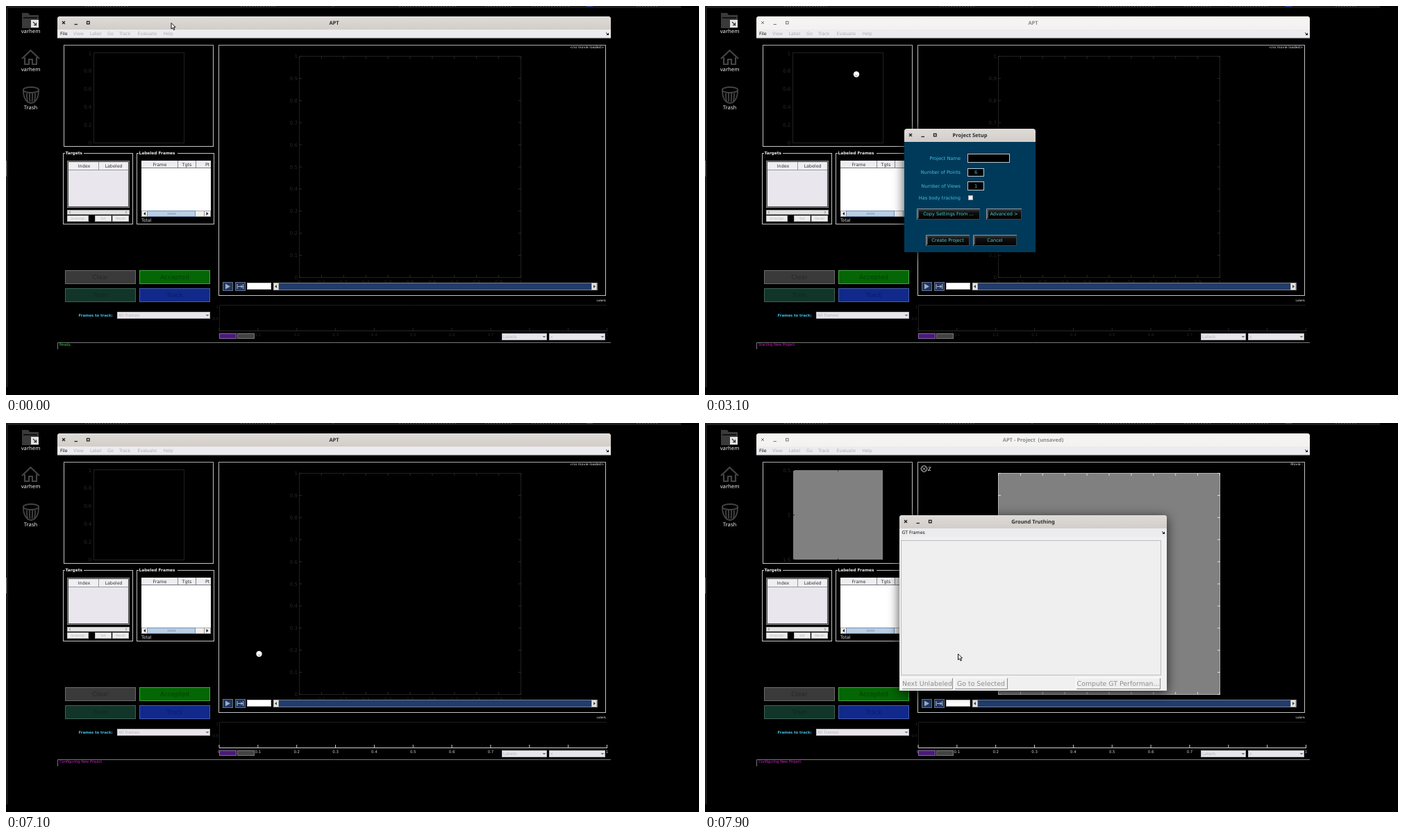
Animation, 998 px wide and 561 px high, one loop 8000 ms. Source, as an HTML page with a canvas:

```html
<!DOCTYPE html>
<html lang="en">
<head>
<meta charset="utf-8">
<title>Project setup</title>
<style>
html, body { margin: 0; width: 998px; height: 561px; overflow: hidden; background: #000 }
canvas { display: block }
</style>
</head>
<body>
<canvas id="stage" width="998" height="561"></canvas>
<script>
const c = document.getElementById('stage').getContext('2d');
const LOOP = 8000, STEP = 100;
const DEJAVU = '"DejaVu Sans", sans-serif', NOTO = '"Noto Sans", "Open Sans", sans-serif';
const DIM = '#272727', OFF = '#aeaeb0', LINE = '#c4c4c4', PALE = '#e9e7ed', BLUE = '#1f4e99';
c.textRendering = 'geometricPrecision';

// Corner-to-corner rectangle with optional one-pixel border
function box(x, y, x2, y2, fill, edge) {
  if (fill) { c.fillStyle = fill; c.fillRect(x, y, x2 - x, y2 - y); }
  if (edge) {
    c.strokeStyle = edge; c.lineWidth = 1;
    c.strokeRect(x + .5, y + .5, x2 - x - 1, y2 - y - 1);
  }
}

function line(color, width, ...p) {
  c.strokeStyle = color; c.lineWidth = width;
  c.beginPath();
  for (let i = 0; i < p.length; i += 2) c.lineTo(p[i], p[i + 1]);
  c.stroke();
}

function poly(color, ...p) {
  c.fillStyle = color;
  c.beginPath();
  for (let i = 0; i < p.length; i += 2) c.lineTo(p[i], p[i + 1]);
  c.fill();
}

// y is the middle of the capitals
function text(s, x, y, size, color, align = 'left', weight = '', font = DEJAVU) {
  c.font = `${weight} ${size}px ${font}`;
  c.textAlign = align;
  c.fillStyle = color;
  c.fillText(s, x, y + size * .36);
}
const bold = (s, x, y, size, color) => text(s, x, y, size, color, 'left', 'bold');

function trash() {
  c.strokeStyle = '#444'; c.lineWidth = 1.8;
  c.beginPath(); c.ellipse(36, 121, 11.2, 4, 0, 0, 7); c.stroke();
  c.beginPath(); c.moveTo(25, 122);
  c.bezierCurveTo(25, 146, 47, 146, 47, 122);
  c.stroke();
  for (const dx of [-6, -2, 2, 6]) {
    c.beginPath(); c.moveTo(36 + dx, 126);
    c.quadraticCurveTo(36 + dx, 134, 36 + dx * .8, 138);
    c.stroke();
  }
}

function desktop() {
  box(0, 0, 998, 561, '#000');
  box(0, 0, 972, 3, '#1d1d1d');
  box(0, 0, 3, 550, '#191919');
  box(0, 223, 1, 246, '#777');
  for (const [x, w] of [[114, 62], [338, 52], [470, 4], [566, 84], [690, 40], [757, 55], [908, 32]])
    for (let i = 0; i < w; i += 4) box(x + i, 0, x + i + 2, 1, '#505050');
  box(836, 0, 845, 1, '#2b4cae');

  poly('#3a3a3a', 23, 10, 32, 10, 34, 13, 47, 13, 47, 32, 23, 32);
  box(25, 16, 45, 18, '#111');
  box(36, 20, 47, 31, '#e4e4e4');
  line('#333', 1.2, 39, 23, 43.5, 27.5, 43.5, 24);
  line('#333', 1.2, 43.5, 27.5, 40, 27.5);

  line('#444', 2.2, 23, 76, 35.5, 64, 48, 76);
  line('#444', 2.2, 27, 74, 27, 84, 33, 84, 33, 77, 38, 77, 38, 84, 44, 84, 44, 74);
  trash();

  for (const [s, y] of [['varhem', 36], ['varhem', 91], ['Trash', 146]])
    text(s, 35.5, y, 7.7, '#f0f0f0', 'center', '', NOTO);
}

// Window frame with soft shadow: title bar with three buttons, then a body
function frame(x, y, x2, y2, bar, title, active, body) {
  c.save();
  c.shadowColor = 'rgba(0,0,0,.75)'; c.shadowBlur = 16; c.shadowOffsetY = 3;
  c.fillStyle = body;
  c.beginPath(); c.roundRect(x, y, x2 - x, y2 - y, [4, 4, 0, 0]); c.fill();
  c.restore();
  const g = c.createLinearGradient(0, y, 0, y + 19);
  g.addColorStop(0, active ? '#dfdbd8' : '#f6f5f4');
  g.addColorStop(1, active ? '#d2cdc8' : '#f3f2f1');
  c.fillStyle = g;
  c.beginPath(); c.roundRect(x, y, x2 - x, bar - y, [4, 4, 0, 0]); c.fill();
  const ink = active ? '#222' : '#777', w = active ? 1.3 : 1, m = y + 9;
  line(ink, w, x + 7, m - 2, x + 11, m + 2);
  line(ink, w, x + 11, m - 2, x + 7, m + 2);
  line(ink, w, x + 24.5, m + 2.5, x + 29, m + 2.5);
  c.lineWidth = w; c.strokeRect(x + 42.5, m - 1.7, 3.6, 3.6);
  text(title, (x + x2) / 2, m + .4, 7.5, active ? '#2b2f30' : '#85888a', 'center', 'bold', NOTO);
}

function dockArrow(x, y) {
  line('#111', 1, x - 2, y - 1.5, x + 1, y + 1);
  poly('#111', x + 2, y - 1.5, x + 2, y + 2, x - 1.5, y + 2);
}

function dropdown(x, x2, y, s) {
  box(x, y, x2, y + 10, '#e8e6eb', '#b5b5bb');
  text(s, x + 2, y + 5, 6, '#b5b5ba');
  poly('#777', x2 - 6.5, y + 4, x2 - 1.5, y + 4, x2 - 4, y + 6.5);
}

function panel(x, x2, title, titleEnd) {
  box(x, 212, x2, 315, null, LINE);
  box(x + 3, 209, titleEnd, 215, '#000');
  bold(title, x + 3.5, 212.3, 5.85, '#e8e8e8');
}

function lists() {
  panel(82, 183, 'Targets', 112);
  box(88, 223, 178, 291, '#000', '#8a8a8a');
  box(89, 224, 177, 290, PALE, '#444');
  box(90, 225, 176, 236, '#efeef2');
  line('#999', 1, 90, 236.5, 176, 236.5);
  line('#999', 1, 133.5, 225, 133.5, 236);
  text('Index', 112.5, 230.5, 6.4, '#333', 'center');
  text('Labeled', 155, 230.5, 6.4, '#333', 'center');
  box(88, 294, 178, 301, '#e2e2e2', '#aaa');
  line('#888', 1, 93, 296, 91, 297.5, 93, 299);
  line('#888', 1, 172, 296, 174, 297.5, 172, 299);
  for (const [x, x2, s] of [[88, 119, 'Unassign'], [128, 152, 'Set'], [153, 177, 'Recall']]) {
    box(x, 302, x2, 311, '#ededed', '#bbb');
    text(s, (x + x2) / 2, 306.5, 4.6, '#b4b4b4', 'center');
  }

  panel(188, 300, 'Labeled Frames', 247);
  box(195, 223, 295, 304, '#fff');
  box(195, 223, 295, 233, '#eeedf1');
  line('#777', 1, 195, 233.5, 295, 233.5);
  for (const x of [247.5, 273.5]) line('#888', 1, x, 223, x, 233);
  text('Frame', 221.5, 228.5, 6.4, '#333', 'center');
  text('Tgts', 260.5, 228.5, 6.4, '#333', 'center');
  text('Pt', 287, 228.5, 6.4, '#333');
  box(195, 295, 295, 304, '#eee', '#aaa');
  box(203, 295, 273, 304, '#b9cfe4', '#7590b4');
  for (let x = 233; x < 245; x += 2) box(x, 298, x + 1, 301, '#849fbf');
  line('#999', 1, 285.5, 295, 285.5, 304);
  poly('#222', 201, 297, 201, 302, 198, 299.5);
  poly('#222', 288.5, 297, 288.5, 302, 291.5, 299.5);
  text('Total', 195, 309, 6.2, '#d8d8d8');
}

function bigButton(x, y, s, fill, edge, ink) {
  box(x, y, x + 102, y + 20, fill, edge);
  text(s, x + 51, y + 9.5, 9, ink, 'center');
}

function controls() {
  bigButton(85, 381, 'Clear', '#3b3a3a', '#6b6b6b', '#272727');
  bigButton(192, 381, 'Accepted', '#046604', '#43a743', '#034003');
  bigButton(85, 407, 'Train', '#123529', '#3d6455', '#0c2a20');
  bigButton(192, 407, 'Track', '#10298b', '#475dae', '#0a1d6c');
  bold('Frames to track:', 104.5, 446, 5.3, '#45bde2');
  dropdown(160, 294, 441, 'All frames');

  for (const x of [312, 330]) box(x, 398, x + 15, 411, '#203660', '#65708a');
  poly('#9fabbf', 316, 400.5, 316, 408.5, 323, 404.5);
  line('#b5bfce', 1, 333, 401, 333, 408);
  line('#b5bfce', 1, 341.5, 401, 341.5, 408);
  line('#b5bfce', 1, 334, 404.5, 340.5, 404.5);
  line('#b5bfce', 1, 338, 402.5, 340.5, 404.5, 338, 406.5);
  box(347, 399, 382, 409, '#fff', '#bbb');
  box(385, 399, 852, 410, '#223c6b', '#737f96');
  for (const [x, d] of [[385, -1], [843, 1]]) {
    box(x, 399, x + 8, 410, '#e4e4e4', '#aaa');
    poly('#444', x + 4 - d, 402, x + 4 - d, 407, x + 4 + 2 * d, 404.5);
  }
}

function plots(loaded) {
  box(83, 56, 299, 203, null, LINE);
  box(306, 56, 864, 418, null, LINE);
  if (loaded) {
    box(127, 68, 256, 197, '#808080');
    ['0.5', '1', '1.5'].forEach((s, i) => {
      text(s, 123.5, 68 + i * 64.6, 7.3, DIM, 'right');
      line('#222', 1, 127, 68.5 + i * 64.2, 129, 68.5 + i * 64.2);
    });
    for (const y of [68, 195]) box(191, y, 192, y + 2, '#333');
    box(422, 72, 742, 392, '#808080', '#b4b4b4');
  } else {
    box(126, 67, 257, 198, null, '#202020');
    for (let i = 0; i < 6; i++)
      text(i / 5, 123.5, 197 - i * 25.8, 7.3, DIM, 'right');
    box(422, 72, 742, 392, null, '#202020');
  }
  const tick = loaded ? '#e0e0e0' : '#2c2c2c';
  for (let i = 0; i <= 10; i++) {
    const x = 422.5 + i * 31.9, y = 391.5 - i * 31.9;
    line(tick, 1, 422, y, 426, y);
    line(tick, 1, 738, y, 742, y);
    line(tick, 1, x, 391, x, 388);
    line(tick, 1, x, 73, x, 76);
    if (!loaded) {
      text(i / 10, 420, y, 7.2, DIM, 'right');
      text(i / 10, x, 398.5, 7.2, DIM, 'center');
    }
  }
  if (loaded) {
    c.strokeStyle = '#d8d8d8'; c.lineWidth = 1;
    c.beginPath(); c.arc(315.5, 66, 4.3, 0, 7); c.stroke();
    line('#d8d8d8', .8, 312.5, 63, 318.5, 69);
    line('#d8d8d8', .8, 318.5, 63, 312.5, 69);
    text('z', 321, 65, 12, '#e0e0e0', 'left', 'italic', '"Liberation Serif", serif');
  }
  text(loaded ? 'Movie :' : '<no movie loaded>', 861, 59.5, 4.9, '#f4f4f4', 'right');
}

function timeline(lit) {
  text('Labels', 864, 424, 4.2, '#f0f0f0', 'right');
  line('#1d1d1d', 1, 307.5, 470, 307.5, 431.5, 865, 431.5);
  text('1', 306, 434, 5.4, DIM, 'right');
  text('0.5', 306, 451.5, 5.4, DIM, 'right');
  const ink = lit ? '#d0d0d0' : DIM;
  line(ink, 1, 307, 468.5, 866, 468.5);
  for (let i = 0; i <= 10; i++) {
    const x = 307 + i * 55.85;
    line(ink, 1, x, 468, x, 464);
    text(i / 10, x, 474, 5.4, ink, 'center');
  }
  box(307, 472, 332, 480, '#4a1a78', '#8765a5');
  box(333, 472, 358, 480, '#434343', '#777');
  dropdown(714, 779, 472, 'Labels');
  dropdown(782, 863, 472, 'x');
}

function mainWindow(t) {
  const loaded = t >= 7300, active = t < 2800 || t >= 6600 && t < 7400;
  plots(loaded);
  lists();
  controls();
  timeline(t >= 6900);
  line('#777', 1, 74.5, 495, 74.5, 485.5, 871, 485.5);
  const [msg, ink] = t < 1900 ? ['Ready.', '#2ee02e']
    : [t < 6500 ? 'Starting New Project.' : 'Configuring New Project.', '#d524d0'];
  text(msg, 77, 488.6, 5.1, ink);

  frame(74, 15, 871, 46, 34, loaded ? 'APT - Project  (unsaved)' : 'APT', active, '#ecebee');
  line('#c8c8cc', 1, 74, 46, 871, 46);
  const open = t >= 800 && t < 1900;
  if (open) box(74, 34, 92, 46, BLUE);
  const menus = [['File', 78], ['View', 97], ['Label', 120.5], ['Go', 146], ['Track', 163], ['Evaluate', 189.5], ['Help', 226.5]];
  menus.forEach(([s, x], i) => text(s, x, 40, 6.3, i ? OFF : open ? '#fff' : '#111'));
  dockArrow(866, 40);
}

function fileMenu(t) {
  if (t < 1100 || t >= 1900) return;
  box(74, 46, 182, 167, '#fff', '#9a9a9a');
  // label, y, enabled, shortcut
  const items = [
    ['Quick Open Movie', 53.5, 1], ['New Project...', 65.8, 1], ['Save Project', 77, 0, 'Ctrl+S'],
    ['Save Project As...', 88.5, 0], ['Load Project...', 100, 1, 'Ctrl+O'], ['Shortcuts...', 111.5, 0],
    ['Manage Movies...', 124, 0, 'Ctrl+M'], ['Import/Export', 135.5, 0], ['Edit cropping', 148, 0], ['Quit', 160.3, 1]
  ];
  const hot = t < 1500 ? -1 : t < 1600 ? 0 : 1;
  items.forEach(([s, y, on, key], i) => {
    if (i === hot) box(75, y - 5.8, 181, y + 5.7, BLUE);
    const ink = i === hot ? '#dce8ff' : on ? '#111' : OFF;
    text(s, 88, y, 6.27, ink);
    if (key) text(key, 168.5, y, 5.1, ink, 'right');
  });
  for (const y of [117.5, 141.5, 154.5]) line('#aaa', 1, 75, y, 181, y);
  poly('#aaa', 173, 133, 173, 138, 176, 135.5);
}

function darkButton(x, x2, y, s) {
  const g = c.createLinearGradient(0, y, 0, y + 16);
  g.addColorStop(0, '#4a4a4a'); g.addColorStop(.35, '#101010'); g.addColorStop(1, '#000');
  box(x, y, x2, y + 16, g);
  line('#8a9298', 1, x2, y + .5, x + .5, y + .5, x + .5, y + 16);
  line('#555', 2, x + 2, y + 2, x + 2, y + 14);
  line('#3a444a', 1, x + 1, y + 15.5, x2 - .5, y + 15.5, x2 - .5, y + 1);
  text(s, (x + x2) / 2, y + 7.8, 6.6, '#3fd0cf', 'center');
}

function setupDialog(t) {
  if (t < 2800 || t >= 6600) return;
  frame(287, 177, 476, 355, 196, 'Project Setup', true, '#003a5b');
  const ink = '#43bfdc';
  [['Project Name', 219.5], ['Number of Points', 240], ['Number of Views', 260], ['Has body tracking', 276.3]]
    .forEach(([s, y]) => text(s, 368, y, 6.65, ink, 'right'));
  box(378, 213, 439, 226, '#000', '#c0c8cc');
  box(378, 234, 402, 246, '#000', '#c0c8cc');
  box(378, 253, 402, 266, '#000', '#c0c8cc');
  text('6', 390, 240, 6.65, ink, 'center');
  text('1', 390, 260, 6.65, ink, 'center');
  box(379, 273, 386, 280, '#f2f2f2', '#a8a8a8');
  darkButton(305, 396, 292, 'Copy Settings From ...');
  darkButton(405, 456, 292, 'Advanced >');
  darkButton(318, 381, 330, 'Create Project');
  darkButton(386, 449, 330, 'Cancel');

  const typed = 'horse'.slice(0, Math.max(0, (t - 4500) / STEP));
  text(typed, 379.5, 220, 6.65, '#3fd0cf');
  if (t >= 4400 && (t < 5300 || t >= 5600)) {
    const x = 380 + c.measureText(typed).width;
    line('#3fd0cf', 1, x, 216, x, 224);
  }
}

function lightButton(x, x2, y, s, ink) {
  box(x, y, x2, y + 17, '#efefef');
  line('#fff', 1, x + .5, y + 17, x + .5, y + .5, x2, y + .5);
  line('#8c8c8c', 1, x + 1, y + 16.5, x2 - .5, y + 16.5, x2 - .5, y + 1);
  text(s, (x + x2) / 2, y + 8.3, 9.4, ink, 'center');
}

function moviesWindow(t) {
  if (t < 7400 || t >= 7700) return;
  frame(465, 9, 851, 263, 27, 'Manage Movies', true, '#f0f0f0');
  box(465, 27, 851, 40, '#ecebee');
  text('File', 469, 33.7, 6.3, '#111');
  text('Help', 488, 33.7, 6.3, OFF);
  dockArrow(846, 34);
  text('Movie List', 471, 47.5, 6.3, '#111');
  text('GT Movie List', 509, 47.5, 6.3, '#111');
  line('#777', 1, 504, 43, 507, 52);
  line('#777', 1, 551.5, 43, 554.5, 52);
  box(469, 56, 849, 235, null, '#dadada');
  box(474, 61, 845, 229, PALE, '#8a8a8a');
  box(475, 62, 844, 72, '#eeedf1');
  line('#888', 1, 475, 71.5, 844, 71.5);
  line('#888', 1, 734, 62, 734, 72);
  text('Movie', 605, 67, 6.4, '#333', 'center');
  text('Num Labels', 789, 67, 6.4, '#333', 'center');
  lightButton(472, 556, 239, 'Switch to Movie', '#111');
  lightButton(559, 642, 239, 'Next Unlabeled', '#111');
  lightButton(688, 765, 239, 'Add Movie', '#111');
  lightButton(767, 844, 239, 'Remove Movie', '#111');
}

function truthWindow(t) {
  if (t < 7700) return;
  frame(280, 133, 665, 386, 152, 'Ground Truthing', true, '#f0f0f0');
  box(280, 152, 665, 164, '#ecebee');
  text('GT Frames', 283.5, 158, 6.3, '#111');
  dockArrow(660, 158);
  box(282, 169, 657, 364, '#efefef', '#bdbdbd');
  lightButton(283, 357, 367, 'Next Unlabeled', '#8d8d8d');
  lightButton(359, 436, 367, 'Go to Selected', '#8d8d8d');
  lightButton(534, 656, 367, 'Compute GT Performan...', '#8d8d8d');
}

// Pointer stops: time, x, y
const path = [
  [0, 238, 24.5], [300, 238, 24.5], [500, 284, 58], [600, 240, 60], [800, 84, 38], [1400, 84, 38],
  [1700, 87, 64.5], [1900, 87, 64.5], [2700, 218, 98.5], [3600, 218, 98.5], [4400, 434, 220],
  [5500, 434, 220], [6200, 377, 308.5], [6300, 364.5, 333], [LOOP, 364.5, 333]
];

function pointer(t) {
  const i = path.findIndex(p => p[0] > t), [t0, x0, y0] = path[i - 1], [t1, x1, y1] = path[i];
  const k = (t - t0) / (t1 - t0), x = x0 + (x1 - x0) * k, y = y0 + (y1 - y0) * k;
  const busy = t >= 1900 && t < 3600 || t >= 6500 && t < 7800;
  if (busy) {
    c.fillStyle = '#fff';
    c.beginPath(); c.arc(x, y, 4.2, 0, 7); c.fill();
    const a = t / 160;
    c.strokeStyle = '#666'; c.lineWidth = .8;
    c.beginPath(); c.arc(x, y, 2, a, a + 2.2); c.stroke();
  } else if (t >= 4400 && t < 5600) {
    line('#ddd', 1, x - 2, y - 4.5, x + 2, y - 4.5);
    line('#ddd', 1, x, y - 4.5, x, y + 4.5);
    line('#ddd', 1, x - 2, y + 4.5, x + 2, y + 4.5);
  } else {
    c.save();
    c.translate(x, y);
    const p = [0, 0, 0, 8.5, 2, 6.8, 3.6, 10, 5, 9.3, 3.5, 6.2, 6, 6];
    poly('#fff', ...p);
    line('#111', 1, ...p, 0, 0);
    c.restore();
  }
}

function draw(now) {
  const t = Math.floor(now % LOOP / STEP) * STEP;
  desktop();
  mainWindow(t);
  fileMenu(t);
  setupDialog(t);
  moviesWindow(t);
  truthWindow(t);
  pointer(t);
  requestAnimationFrame(draw);
}
draw(0);
</script>
</body>
</html>
```
